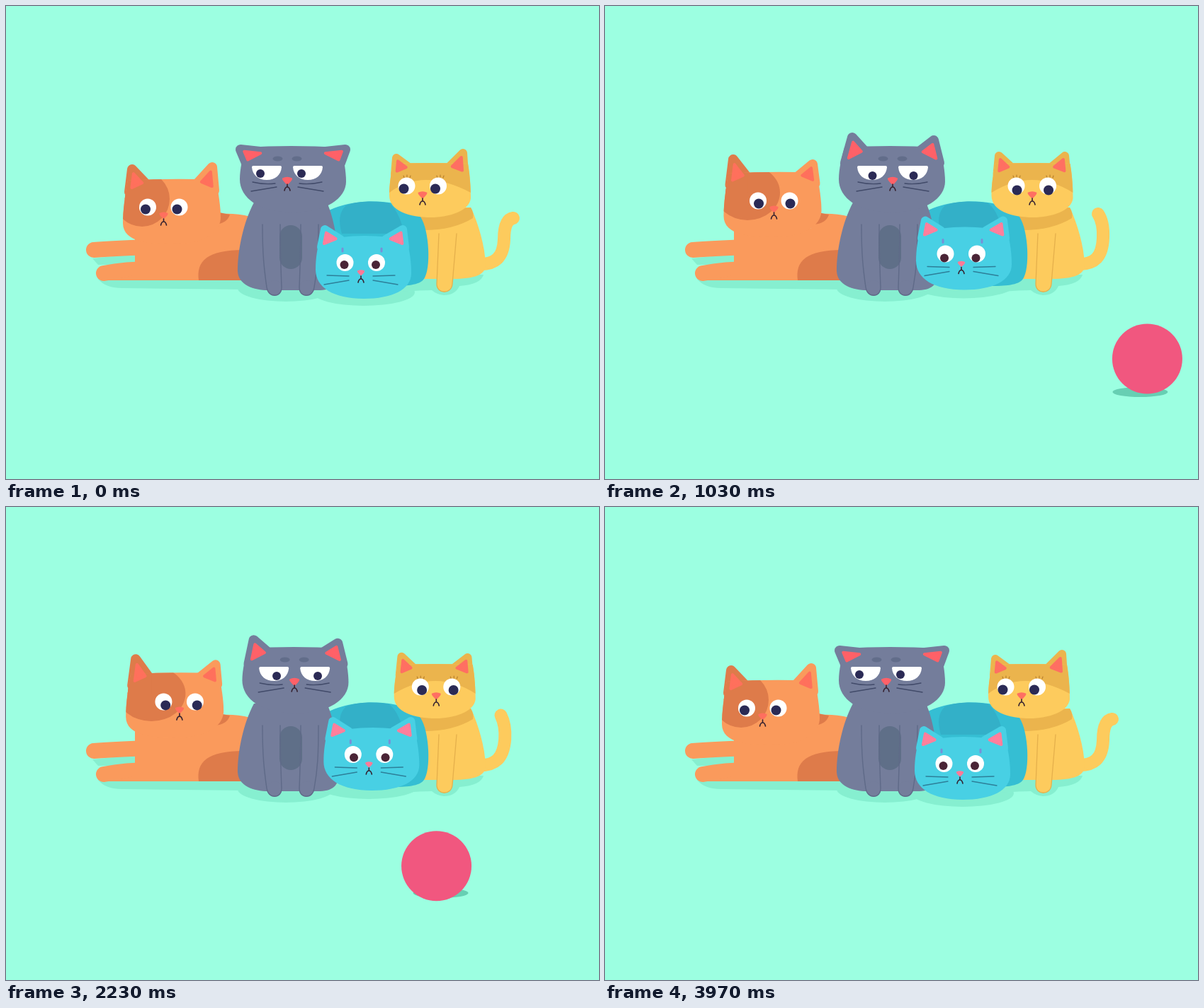
Animation, 837 px wide and 669 px high, one loop 4.01 s. Source, as an HTML page with a canvas:

```html
<!DOCTYPE html>
<html lang="en">
<head>
<meta charset="utf-8">
<title>Four cats and a ball</title>
<style>
html, body { margin: 0; width: 100%; height: 100%; overflow: hidden; background: #9cffe1 }
canvas { display: block }
</style>
</head>
<body>
<canvas id="stage" width="837" height="669"></canvas>
<script>
const c = document.getElementById('stage').getContext('2d');
const LOOP = 4010;
const INK = '#2b2a55', SHADE = '#86efd0';
let now = 0;

// Poses: rest, alert, turning, right, turning back, left
const KEYS = [0, 30, 570, 1030, 1550, 1900, 2530, 2800, 3230, 3730, LOOP];
const POSE = [0, 0, 1, 2, 3, 3, 4, 5, 5, 0, 0];

// Monotone cubic interpolation between the pose values
function at(values, end = 3730) {
  const time = i => i === 9 ? end : KEYS[i];
  const val = i => values[POSE[i]];
  const slope = i => (val(i + 1) - val(i)) / (time(i + 1) - time(i));
  const tangent = i => {
    if (i === 0 || i === 10) return 0;
    const a = slope(i - 1), b = slope(i);
    return a * b <= 0 ? 0 : 2 * a * b / (a + b);
  };
  let i = 0;
  while (i < 9 && now >= time(i + 1)) i++;
  const h = time(i + 1) - time(i), u = (now - time(i)) / h, v = 1 - u;
  return v * v * (1 + 2 * u) * val(i) + u * u * (3 - 2 * u) * val(i + 1)
    + h * u * v * (v * tangent(i) - u * tangent(i + 1));
}

function fill(d, color) {
  c.fillStyle = color;
  c.fill(new Path2D(d));
}

function line(d, color, width) {
  c.strokeStyle = color;
  c.lineWidth = width;
  c.stroke(new Path2D(d));
}

function dot(x, y, rx, color, ry = rx) {
  c.fillStyle = color;
  c.beginPath();
  c.ellipse(x, y, rx, ry, 0, 0, 7);
  c.fill();
}

function moved(x, y, draw) {
  c.save();
  c.translate(x, y);
  draw();
  c.restore();
}

const mix = (a, b, k) => [a[0] + (b[0] - a[0]) * k, a[1] + (b[1] - a[1]) * k];
const poly = pts => 'M' + pts.map(p => p.join(' ')).join('L') + 'Z';

function ear(pts, color, r) {
  fill(poly(pts), color);
  line(poly(pts), color, 2 * r);
}

function innerEar(pts, color) {
  const [tip, out, inn] = pts;
  const center = mix(tip, mix(out, inn, .5), .62);
  const small = poly(pts.map(p => mix(center, p, .62)));
  fill(small, color);
  line(small, color, 4);
}

// Ears are [tip, outer base, inner base], skull and bases move by x, y
function head(cat, x, y, tips, marks) {
  const ears = tips.map((tip, i) => [tip, ...cat.bases[i].map(b => [b[0] + x, b[1] + y])]);
  ears.forEach((e, i) => ear(e, i ? cat.rightEar || cat.skin : cat.leftEar || cat.skin, cat.r));
  moved(x, y, () => {
    fill(cat.skull, cat.skin);
    if (marks) {
      c.clip(new Path2D(cat.skull));
      c.translate(-x, -y);
      marks();
    }
  });
  ears.forEach(e => innerEar(e, cat.pink));
}

function muzzle(color, size) {
  moved(0, 0, () => {
    c.scale(size, size);
    fill('M-6 -3Q0 -6 6 -3Q7 -1 1 4.5Q0 5 -1 4.5Q-7 -1 -6 -3Z', color);
  });
  line('M0 5V9M-4 14Q-3 9 0 9Q3 9 4 14', '#35212f', 1.6);
}

function roundEyes(dx, dy, up, r, color) {
  for (const x of [-22.5, 22]) {
    dot(x, -up, 12, '#fff');
    dot(x + dx, dy - up, r, color);
  }
}

function whiskers(d, color) {
  line(d, color, 1.3);
  c.save();
  c.scale(-1, 1);
  line(d, color, 1.3);
  c.restore();
}

const ORANGE = {
  skin: '#fa9a5c', leftEar: '#de7b4a', pink: '#ff705c', r: 7,
  skull: 'M172 238Q235 234 296 237C300 255 303 275 303 290C303 306 288 328 235 328C205 328 165 326 165 298C165 280 168 258 172 238Z',
  bases: [[[174, 254], [198, 243]], [[294, 252], [270, 242]]]
};
const GREY = {
  skin: '#747d9b', pink: '#ff6168', r: 7,
  skull: 'M338 200Q400 196 472 200C477 215 480 235 480 248C480 272 452 292 405 292C358 292 330 272 330 245C330 230 334 215 338 200Z',
  bases: [[[339, 222], [368, 207]], [[472, 222], [442, 207]]]
};
const BLUE = {
  skin: '#48d0e4', pink: '#ff7f9c', r: 6,
  skull: 'M442 320Q500 305 566 318C570 335 572 350 572 365C572 388 545 401 505 401C462 401 437 385 437 360C437 345 439 332 442 320Z',
  bases: [[[445, 328], [472, 317]], [[563, 328], [536, 317]]]
};
const YELLOW = {
  skin: '#fdcb5d', leftEar: '#ebb44d', rightEar: '#ebb44d', pink: '#ff6f62', r: 6,
  skull: 'M546 223Q600 221 652 223C655 240 656 258 656 272C654 290 625 299 600 299C570 299 541 290 541 268C541 250 544 236 546 223Z',
  bases: [[[549, 238], [570, 229]], [[647, 238], [624, 229]]]
};

function shadows(blueX, blueY) {
  fill('M122 357L190 350V366H130ZM130 386H345V401Q240 400 165 399Q140 399 130 386Z', SHADE);
  dot(395, 399, 68, SHADE, 19);
  dot(505 + blueX * .6, 394 + blueY * .85, 72, SHADE, 19);
  fill('M560 380H674Q670 394 640 396Q634 409 618 409Q608 408 601 402Q585 402 560 404Z', SHADE);
}

function yellowBody() {
  const tail = [
    [703, 703, 703, 705, 703, 702], [330, 330, 328, 328, 330, 332],
    [703, 703, 704, 706, 705, 706], [302, 302, 306, 306, 310, 310],
    [716, 714, 696, 695, 705, 717], [300, 299, 294, 295, 294, 293]
  ].map(v => at(v, 3970));
  line(`M664 365C692 367 702 354 ${tail[0]} ${tail[1]}Q${tail.slice(2)}`, '#fdcb5d', 18);
  fill('M580 285H656C667 308 676 340 677 366C677 380 662 386 630 386H580Z', '#fdcb5d');
  fill('M575 292L656 285Q661 293 659 300Q630 318 585 317Z', '#ebb44d');
  fill('M611 322L608 393C608 408 629 408 630 393L636 322Z', '#fdcb5d');
  line('M611 322L608 393C608 408 629 408 630 393L636 322', '#e5b04c', 1.3);
}

function blueBody() {
  fill('M440 300C470 270 562 268 585 298C598 318 600 372 590 386C582 398 550 396 520 396L440 380Z', '#35bed3');
  fill('M480 282C470 292 469 304 474 322H562C558 304 552 288 541 279C520 275 496 276 480 282Z', '#33b0c8');
}

function orangeBody() {
  line('M124 345Q150 343 200 341', '#fa9a5c', 22);
  line('M138 378Q170 372 205 372', '#fa9a5c', 22);
  fill('M182 315H290L305 294Q325 293 345 298V388H137Q160 386 182 380Z', '#fa9a5c');
  fill('M272 388C268 360 285 344 340 345V388Z', '#de7b4a');
  fill('M301 292L316 295Q312 308 294 309Z', '#de7b4a');
}

function greyBody() {
  fill('M350 278C335 306 327 345 327 375C328 395 350 402 370 402H440C460 402 471 396 470 372C470 340 463 300 453 278Z', '#747d9b');
  c.fillStyle = '#5f6f88';
  c.beginPath();
  c.roundRect(386, 310, 32, 62, 16);
  c.fill();
  for (const [x, d] of [[0, 'M362 309C362 350 364 370 368 398C370 413 389 413 389 398C388 370 387 350 387 309'],
                        [1, 'M441 309C441 350 440 370 435 398C433 413 414 413 414 398C415 370 416 350 416 309']]) {
    dot(x ? 424.5 : 379, 399, 10.5, '#747d9b', 11);
    line(d, '#5f6a88', 1.4);
  }
}

function orangeHead() {
  const x = at([0, 0, 2.5, 9, 0, 0]), y = at([9, 4.5, -1, -3, 0, 0]);
  const nx = at([222.5, 229.5, 238.5, 255, 231, 222.5]), ny = at([296, 292.5, 287, 286, 288, 287]);
  const tips = [
    [at([178, 179, 181, 187, 179, 178]), at([231, 225, 217, 213, 219, 223])],
    [at([291, 291, 293, 300, 291, 290]), at([228, 227, 224, 224, 222, 219])]
  ];
  head(ORANGE, x, y, tips, () => {
    const left = 165 + x, right = nx + 8.5, cx = (left + right) / 2 - 6, cy = ny - 23;
    dot(cx, cy, right - cx, '#de7b4a', 39);
    c.fillRect(left - 5, cy - 60, cx - left + 5, 60);
  });
  moved(nx, ny, () => {
    roundEyes(at([-3, -1, 1, 4.5, 0, -3]), at([3, 4, 4, 3.5, 6, 3]), 11.5, 7, INK);
    muzzle('#ff6f5e', 1);
  });
}

function greyHead() {
  const x = at([0, 0, 0, 7.5, 0, 0]);
  head(GREY, x, 0, [
    [at([331, 345, 349, 355, 345, 345]), at([203, 190, 186, 186, 190, 190])],
    [at([479, 465, 464, 472, 465, 465]), at([203, 190, 190, 194, 191, 190])]
  ]);
  moved(at([397, 398.5, 406, 419, 397, 397]), 247, () => {
    const dx = at([-9, -8.5, .5, 9.5, -4, -9]), dy = at([11, 11, 14, 13, 13, 11]);
    for (const s of [-1, 1]) {
      dot(s * 13.5, -31, 7, '#626d8a', 3.5);
      moved(s * 29, -21, () => {
        fill('M-21 2Q-21 0 -19 0H19Q21 0 21 2C20 13 12 20 0 20C-12 20 -20 13 -21 2Z', '#fff');
        dot(dx, dy, 6, INK);
      });
    }
    whiskers('M-49 2Q-32 6 -17 4M-51 15L-15 9', '#414a69');
    muzzle('#ff6168', 1.15);
  });
}

function blueHead(x, y) {
  head(BLUE, x, y, [[450 + x, 303 + y], [560 + x, 303 + y]]);
  moved(501 + x, 364 + y, () => {
    roundEyes(at([-1, -6, -1.5, 3.5, -2, -4]), at([3, 4, 6, 4, 4.5, 4]), 14, 6, '#4a2436');
    line('M-26 -34V-30M29 -34V-30', '#7790d8', 3);
    whiskers('M-48 4L-17 5M-52 17L-17 11', '#2d7f99');
    muzzle('#ff7a98', .85);
  });
}

function yellowHead() {
  const x = at([0, 0, 4.5, 14.5, 0, 0]);
  const nx = at([588, 589.5, 603, 623, 591, 588]);
  head(YELLOW, x, 0, [
    [at([551, 551, 556, 567, 551, 551]), at([215, 215, 212, 210, 214, 215])],
    [at([645, 645, 649, 659, 645, 645]), at([208, 209, 212, 215, 210, 208])]
  ], () => fill(`M${530 + x} 210H${670 + x}V264H${656 + x}Q${nx} 228 ${541 + x} 264H${530 + x}Z`, '#ebb44d'));
  moved(nx, 267, () => {
    for (const s of [-22, 25]) line(`M${s - 4} -24L${s - 5} -27M${s} -25V-28M${s + 4} -24L${s + 5} -27`, '#b9812f', 1.2);
    roundEyes(at([-4, -2, 1, 4.5, -1, -4]), at([4, 4.5, 6, 4, 5, 4]), 12.5, 7, INK);
    muzzle('#ff6f62', 1.05);
  });
}

// Rolls right, then back left, wobbling a little once per turn
function ball() {
  const back = now > 1500;
  const sx = back ? 186 - 1.43 * (now - 2530) : 98 + 1.426 * (now - 570);
  const x = back ? sx - 6 : sx + 2 + 8 * (now - 570) / 460;
  if (x < -60 || x > 900) return;
  const turn = 2 * Math.PI / 230 * (back ? now - 2530 : now - 570) + (back ? 4.3 : 0);
  dot(sx, 546, 39, '#67cfb3', 7);
  dot(x, 504 - 5 * Math.cos(turn), 49.5, '#f1577f');
}

function draw(ms) {
  now = ms % LOOP;
  c.fillStyle = '#9cffe1';
  c.fillRect(0, 0, 837, 669);
  c.lineCap = c.lineJoin = 'round';
  const blueX = at([0, 0, 2, 24.5, 0, 0]), blueY = at([13, 5, .5, 0, 0, 0]);
  shadows(blueX, blueY);
  yellowBody();
  blueBody();
  orangeBody();
  orangeHead();
  greyBody();
  blueHead(blueX, blueY);
  greyHead();
  yellowHead();
  ball();
}

const start = performance.now();
function tick() {
  draw(performance.now() - start);
  requestAnimationFrame(tick);
}
tick();
</script>
</body>
</html>
```
